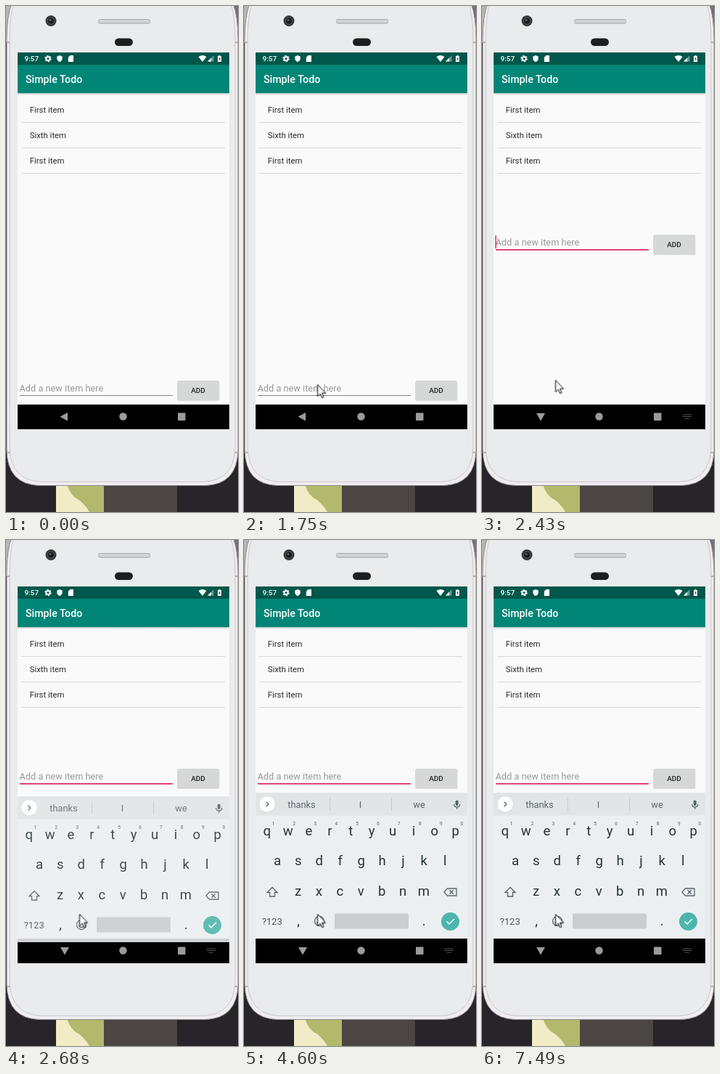
An HTML page that plays this animation: 320 by 697 pixels, repeating every 8000 ms.

```html
<!DOCTYPE html>
<html lang="en">
<head>
<meta charset="utf-8">
<title>Simple Todo</title>
<style>
  html, body { margin: 0; width: 100%; height: 100%; overflow: hidden; background: #27252a; }
  svg { display: block; width: 100%; height: 100%; font-family: Roboto, sans-serif; }
  .medium { font-weight: 500; }
  .mid { text-anchor: middle; }
  .item { font-size: 11.37px; fill: #2a2a2a; }
  .key { font-size: 18.5px; fill: #263238; }
  .digit { font-size: 7px; fill: #5c676c; }
  .word { font-size: 12.8px; fill: #5b676d; }

  /* Every change is a hard cut: percentages are milliseconds / 80. */
  .cursor, .form, .idle, .focus, .caret, .keyboard { animation: 8s step-end infinite; }
  .cursor { animation-name: cursor; }
  .form { animation-name: form; }
  .idle { animation-name: idle; }
  .focus { animation-name: focus; }
  .caret { animation-name: caret; }
  .keyboard { animation-name: keyboard; }
  .nav-closed { animation: 8s step-end infinite nav-closed; }
  .nav-open { animation: 8s step-end infinite nav-open; }

  @keyframes cursor {
    0% { transform: translate(222.5px, 658.5px); opacity: 0; }
    6.25% { transform: translate(222.5px, 658.5px); opacity: 1; }
    8.125% { transform: translate(160.5px, 654.5px); }
    9.625% { transform: translate(115.5px, 646.5px); }
    11.5% { transform: translate(107.5px, 598.5px); }
    13.125% { transform: translate(100.5px, 549.5px); }
    15% { transform: translate(102.5px, 517.5px); }
    16.875% { transform: translate(101.5px, 515.5px); }
    21.875% { transform: translate(101.5px, 521.5px); }
    23.5%, 100% { transform: translate(101.5px, 515.5px); opacity: 1; }
  }
  @keyframes form {
    0% { transform: none; }
    30.375%, 100% { transform: translateY(-201px); }
  }
  @keyframes idle { 0% { opacity: 1; } 23.5%, 100% { opacity: 0; } }
  @keyframes focus { 0% { opacity: 0; } 23.5%, 100% { opacity: 1; } }
  @keyframes caret {
    0%, 33.5%, 44.25%, 57.5%, 68.75%, 81.875%, 93.625%, 100% { opacity: 0; }
    23.5%, 37.25%, 50.875%, 62.5%, 75.375%, 88.5% { opacity: 1; }
  }
  @keyframes keyboard {
    0% { transform: translateY(5px); opacity: 0; }
    33.5% { transform: translateY(5px); opacity: .88; }
    35.375%, 100% { transform: none; opacity: 1; }
  }
  @keyframes nav-closed { 0% { opacity: 1; } 30.375%, 100% { opacity: 0; } }
  @keyframes nav-open { 0% { opacity: 0; } 30.375%, 100% { opacity: 1; } }
</style>
</head>
<body>
<svg viewBox="0 0 320 697" preserveAspectRatio="none">
  <defs>
    <linearGradient id="shade" x2="0" y2="1">
      <stop stop-color="#000" stop-opacity=".2"/>
      <stop offset="1" stop-color="#000" stop-opacity="0"/>
    </linearGradient>
  </defs>

  <!-- Blurred scenery behind the phone -->
  <rect width="320" height="697" fill="#27252a"/>
  <rect width="160" height="50" fill="#b4b6b3"/>
  <rect x="160" width="160" height="50" fill="#746c78"/>
  <rect x="69" y="650" width="66" height="47" fill="#efecc6"/>
  <path d="M82 650h53v47h-20q-8-14-20-20-10-8-13-27z" fill="#b3b96c"/>
  <rect x="135" y="650" width="101" height="47" fill="#4b4543"/>

  <!-- Phone body -->
  <path d="M8-4Q1 14 1 45V612Q2 659 46 660.500H275Q319 659 320 612V45Q320 14 313-4z" fill="#f0edf1" stroke="#8f888f"/>
  <path d="M11-4Q5 16 5 45V610Q7 653 48 655.500H273Q314 653 316 610V45Q316 16 310-4z" fill="#e9ebec" stroke="#cbc6cc"/>
  <path d="M1 50h4M1 615h4.500M316 50h4M315.500 615h4.500" stroke="#b5afb6" stroke-width="2"/>
  <circle cx="62" cy="20.500" r="7.500" fill="#36373a"/>
  <circle cx="62" cy="20.500" r="4.500" fill="#17181b" stroke="#595b60"/>
  <circle cx="61" cy="19.500" r="1.500" fill="#65696f"/>
  <rect x="127" y="18" width="72" height="6.500" rx="3" fill="#a9aaac"/>
  <rect x="127.500" y="19" width="71" height="4.300" rx="2.150" fill="#d2d3d5"/>
  <rect x="150" y="44.500" width="25" height="10.500" rx="5.250" fill="#1d1e21"/>

  <!-- App -->
  <rect x="16" y="64" width="292" height="519" fill="#fafafa"/>
  <rect x="16" y="120" width="292" height="3" fill="url(#shade)"/>
  <rect x="16" y="64" width="292" height="17" fill="#00574b"/>
  <rect x="16" y="81" width="292" height="39" fill="#008577"/>
  <text x="27" y="106" class="medium" font-size="14.200" fill="#fff">Simple Todo</text>
  <g fill="#fff">
    <text x="25.500" y="76" class="medium" font-size="9.950">9:57</text>
    <circle cx="58" cy="72.500" r="2.600" fill="none" stroke="#fff" stroke-width="2"/>
    <circle cx="58" cy="72.500" r="4" fill="none" stroke="#fff" stroke-width="1.400" stroke-dasharray="2.100 2.089"/>
    <path d="M74 68l3.700 1.500v2.700q0 3.300-3.700 4.800-3.700-1.500-3.700-4.800v-2.700z"/>
    <path d="M88.500 68h4.500v9h-7.200v-6.300z"/>
    <path d="M265.500 70q5.500-4 11 0L271 77z"/>
    <path d="M286.500 68v8.500H278z" opacity=".4"/>
    <path d="M283 71.500v5h-5z"/>
    <path d="M293.500 68h2v1h1.500v8h-5v-8h1.500z"/>
    <path d="M295 70.500l-1.600 3h1.100v2l1.600-3h-1.100z" fill="#00574b"/>
  </g>
  <g id="list"></g>

  <g class="form">
    <text x="18.500" y="531" font-size="12.780" fill="#999">Add a new item here</text>
    <rect class="idle" x="19" y="536" width="211" height="1" fill="#858585"/>
    <rect class="focus" x="19" y="536" width="211" height="1.600" fill="#d81b60"/>
    <rect class="caret" x="18.300" y="517" width="1.400" height="18" fill="#d81b60"/>
    <rect x="236" y="517" width="58.500" height="27" rx="2" fill="#000" opacity=".12"/>
    <rect x="236.500" y="516" width="57.500" height="27" rx="1.500" fill="#d6d7d7"/>
    <text x="265" y="533" class="medium mid" font-size="9.950" fill="#212121">ADD</text>
  </g>

  <!-- Navigation bar -->
  <rect x="16" y="549" width="292" height="34"/>
  <g fill="#9b9b9b">
    <path class="nav-closed" d="M85 560v11.500l-10.500-5.750z"/>
    <g class="nav-open">
      <path d="M75 561h12l-6 10.500z"/>
      <path d="M277 563h12M277 565.500h12M280 568.300h6" fill="none" stroke="#8c8c8c" stroke-width="1.100" stroke-dasharray="1.200 .9"/>
    </g>
    <circle cx="161.500" cy="565.500" r="5.200"/>
    <rect x="237" y="560.500" width="10.500" height="10.500" rx=".7"/>
  </g>

  <g class="keyboard">
    <rect x="16" y="348" width="292" height="201" fill="#eceff1"/>
    <rect x="16" y="348" width="292" height="31.500" fill="#e1e5e8"/>
    <circle cx="32" cy="364.500" r="11" fill="#000" opacity=".08"/>
    <circle cx="32" cy="364" r="10.700" fill="#fff"/>
    <path d="M118.500 355v18M203.500 355v18" stroke="#c6cccf"/>
    <g class="word mid">
      <text x="79.500" y="368.800">thanks</text>
      <text x="160.500" y="368.800">I</text>
      <text x="241.500" y="368.800">we</text>
    </g>
    <rect x="291.700" y="358.500" width="4" height="7.500" rx="2" fill="#56636a"/>
    <g fill="none" stroke="#56636a" stroke-width="1.300">
      <path d="M30.500 360.800l3.300 3.200-3.300 3.200"/>
      <path d="M289.700 364q0 4 4 4t4-4M293.700 368v2.800"/>
      <path d="M39 478.500l7 7h-3.500v5.500h-7v-5.500H32z"/>
      <path d="M280.500 480H293v10h-12.500l-4.500-5zM283.500 482.300l5.400 5.400M288.900 482.300l-5.400 5.400"/>
      <circle cx="104" cy="525" r="6.500"/>
      <path d="M100.500 526.500q3.500 4.500 7 0"/>
    </g>
    <circle cx="101.800" cy="523" r="1" fill="#56636a"/>
    <circle cx="106.200" cy="523" r="1" fill="#56636a"/>
    <g id="keys"></g>
    <text x="38.700" y="529.500" class="mid" font-size="13" fill="#4a565c">?123</text>
    <rect x="125" y="514.500" width="102" height="21" rx="1.500" fill="#c9cdd0"/>
    <circle cx="284.500" cy="525.500" r="12.500" fill="#4db6ac"/>
    <path d="M279.500 525.500l3.500 3.500 7-7" fill="none" stroke="#fff" stroke-width="1.500"/>
  </g>

  <path class="cursor" d="M0 0V16.200L3.700 12.800 6.200 18.300 8.500 17.300 6.100 11.800H11.200z" fill="#fff" stroke="#000" stroke-linejoin="round"/>
</svg>
<script>
  const svgNs = "http://www.w3.org/2000/svg";

  function add(parent, tag, attrs, text = "") {
    const node = document.createElementNS(svgNs, tag);
    for (const [name, value] of Object.entries(attrs)) node.setAttribute(name, value);
    node.textContent = text;
    parent.append(node);
  }

  const list = document.getElementById("list");
  ["First item", "Sixth item", "First item"].forEach((label, i) => {
    const y = 147 + i * 35;
    add(list, "text", { x: 32.7, y, class: "item" }, label);
    add(list, "rect", { x: 21, y: y + 13, width: 281, height: 1, fill: "#d9d9d9" });
  });

  const keys = document.getElementById("keys");
  const pitch = 28.9;
  const rows = [
    ["qwertyuiop", 31.7, 406.5],
    ["asdfghjkl", 46, 448.3],
    ["zxcvbnm", 74.5, 490.3],
    [",", 75, 531],
    [".", 248.3, 531]
  ];
  rows.forEach(([letters, left, y], row) => {
    [...letters].forEach((letter, i) => {
      const x = left + i * pitch;
      add(keys, "text", { x, y, class: "key mid" }, letter);
      if (row === 0) add(keys, "text", { x: x + 8.7, y: 392.5, class: "digit mid" }, (i + 1) % 10);
    });
  });
</script>
</body>
</html>
```
